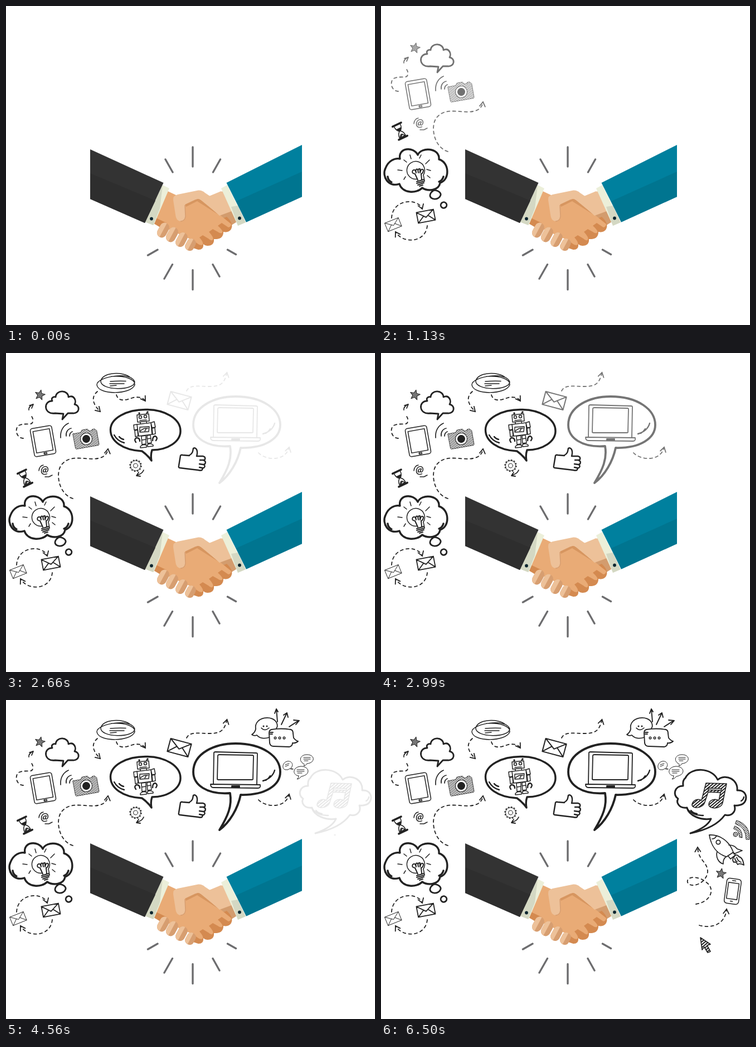
These frames come from a looping animation (662x572 px, 8000 ms). An HTML page:

```html
<!DOCTYPE html>
<html lang="en">
<head>
<meta charset="utf-8">
<title>Handshake</title>
<style>
html, body { margin: 0; width: 100%; height: 100%; overflow: hidden; background: #fff; }
svg { display: block; }
.doodle { fill: none; stroke: #222; stroke-width: 1.5; stroke-linecap: round; stroke-linejoin: round; opacity: 0; }
.dash { stroke-width: 1.8; stroke-dasharray: 5 5.5; marker-end: url(#head); }
.plain { marker-end: none; }
.bold { stroke-width: 3.4; }
.mid { stroke-width: 2.4; }
.thin { stroke-width: 1; }
.ink { fill: #222; }
.hatch { fill: url(#hatch); }
.stripes { fill: url(#stripes); }
.rays { stroke: #6d6d6f; stroke-width: 3.4; stroke-linecap: round; }
</style>
</head>
<body>
<svg width="662" height="572" viewBox="0 0 662 572">
<defs>
  <pattern id="hatch" width="2.6" height="2.6" patternUnits="userSpaceOnUse" patternTransform="rotate(40)">
    <path d="M0 1.3H2.6" stroke="#222" stroke-width="1"/>
  </pattern>
  <pattern id="stripes" width="4" height="4" patternUnits="userSpaceOnUse" patternTransform="rotate(-40)">
    <path d="M0 2H4" stroke="#222" stroke-width="2"/>
  </pattern>
  <marker id="head" markerUnits="userSpaceOnUse" markerWidth="24" markerHeight="24" viewBox="-12 -12 24 24" orient="auto">
    <path d="M-8 -5L0 0L-8 5" fill="none" stroke="#222" stroke-width="1.8" stroke-linecap="round"/>
  </marker>
  <g id="mail"><path d="M-16 -10H16V10H-16ZL0 2L16 -10M-16 10L-4 -1M16 10L4 -1" vector-effect="non-scaling-stroke"/></g>
  <path id="star" fill="#777" stroke-width="1" d="M0 -9L2.5 -3L9 -2.8L4 1.5L5.5 8L0 4.5L-5.5 8L-4 1.5L-9 -2.8L-2.5 -3Z"/>
  <g id="finger">
    <rect x="-8.5" y="-14" width="17" height="28" rx="8.5" fill="#d79e70"/>
    <path d="M0 -14V14A8.5 8.5 0 0 1 -8.5 5.5V-5.5A8.5 8.5 0 0 1 0 -14" fill="#edc199"/>
  </g>
</defs>

<!-- handshake -->
<path class="rays" d="M335 253V288M286 275L299 298M384.500 275L371.500 298M272 437L254.500 447M298.500 463.500L284 489M335 473.500V508.500M371 463.500L383 485M397.500 437L412.500 445.500"/>
<path fill="#edc199" d="M386 332L412 366L384 378L345 349Z"/>
<path fill="#d39c6e" d="M383 375L408 364L414 387L403 394Z"/>
<path fill="#d48a50" d="M340 400L396 378Q409 390 404 400Q400 407 390 405Q390 417 378 418Q374 418 373 418Q374 430 361 430Q357 430 354 427Q355 437 345 437L336 434Z"/>
<path fill="#e9ab76" d="M290 332L320 346L344 348L383 374L404 391Q404 396 399 397L387 389L380 394Q392 405 387 407Q384 408 380 405L371 400L364 405Q375 417 370 420Q367 421 363 417L353 411L347 415Q355 424 353 428Q349 430 345 427L335 420L266 389Z"/>
<path fill="#d48a50" d="M265 390L269 380L288 389L282 400Z"/>
<use href="#finger" transform="translate(282 402) rotate(28)"/>
<use href="#finger" transform="translate(298 410) rotate(28)"/>
<use href="#finger" transform="translate(315 419) rotate(28) scale(.98)"/>
<use href="#finger" transform="translate(331 428) rotate(28) scale(.95 .8)"/>
<path fill="#d79660" d="M320 352L346 345L384 376L343 350L323 360Z"/>
<path fill="#edc199" d="M389 332L410 366L383 376L355 351Q347 344 340 347L321 356L322 377Q321 386 313 386Q305 385 304 374L300 348Q299 340 308 338L345 330.500Q352 330 357 335L366 341Z"/>
<path fill="none" stroke="#d79e70" stroke-width="1.500" d="M321 357L322 377Q321 386 313 386"/>
<path fill="#ecefd9" d="M281 321L293 327L265 393L249 387Z"/>
<path fill="#d4d8c3" d="M281 322L276 363L264 393L249 387Z"/>
<path fill="#333" d="M151 257L282.500 317L249 389L151 346Z"/>
<path fill="#2e2e2e" d="M151 300L268 349L249 389L151 346Z"/>
<path fill="#ecefd9" d="M386 327L397 321L430 388L416 394Z"/>
<path fill="#d4d8c3" d="M404 360L416 358L430 388L416 394Z"/>
<path fill="#00809e" d="M531 249L395.500 317L431 387.500L531 342Z"/>
<path fill="#007590" d="M531 297L413 350L431 387.500L531 342Z"/>
<circle cx="261" cy="381.500" r="2.900" fill="#0c2630"/>
<circle cx="419" cy="380.500" r="2.900" fill="#0c2630"/>

<!-- ideas -->
<g class="doodle">
  <g transform="translate(34 224.500) rotate(-25.500)">
    <path d="M-8.500 -13H8.500M-8.500 13H8.500" stroke-width="3.500"/>
    <path d="M-6 -11Q-6 -4 -1 0Q-6 4 -6 11M6 -11Q6 -4 1 0Q6 4 6 11"/>
    <path class="ink" d="M-4 -5H4L0 0Z"/>
    <path class="stripes" d="M-5 11Q0 1 5 11Z"/>
  </g>
  <path class="bold" d="M34 274C30 254 58 251 66 267C72 252 106 254 104 275C123 280 124 312 106 317C104 331 84 333 74 326C64 337 38 336 33 319C13 326 1 305 8 291C13 278 24 272 34 274Z"/>
  <path class="bold" d="M12 306Q13 313 19 316M112 306Q110 313 104 315"/>
  <path d="M64 310.500A16 16 0 1 1 76 303L78 313M52 267L54 274M41 276L46 280M72 267L69 273M87 276L80 283M30 294L38 295M82 293L89 295M41 311L44 306M83 304L88 308"/>
  <path stroke-width="2" d="M66 312L61 301Q54 300 57 295Q61 291 63 299Q61 291 66 293L67 299Q65 291 70 292L70 299Q72 290 76 294Q76 300 72 301L73 311M64 315L77 311M64 318L78 314M66 321L77 317M69 323L75 321"/>
  <path stroke-width="2.800" d="M91 333C96 327 108 333 107 339C104 349 87 348 88 339Q89 334 93 332M109 353C115 349 121 356 116 361C110 365 104 358 109 353"/>
  <use href="#mail" class="thin" transform="translate(22 392) rotate(-22) scale(.81)"/>
  <use href="#mail" transform="translate(80.500 377) rotate(-11) scale(.97)" stroke-width="1.800"/>
  <path class="dash" d="M19 380C21 345 67 344 74 364"/>
  <path class="dash" d="M83 394C80 425 39 427 26 405"/>
</g>

<!-- media -->
<g class="doodle">
  <use href="#star" transform="translate(61 75) rotate(12)"/>
  <path stroke-width="2.800" d="M103 109L88 108C68 111 66 86 83 86C80 80 86 78 89 79C90 65 112 66 112 79C122 74 127 86 123 92C134 94 132 109 120 108L111 108L101 119L103 109"/>
  <path class="dash plain" d="M31 153C18 153 14 133 25 129C37 125 48 131 48 122Q49 115 43 111"/>
  <path d="M41 102Q40 97 48 92M42 94L49 92L46 99" stroke-width="1.800"/>
  <g transform="translate(66.500 158) rotate(-10)">
    <rect x="-19.500" y="-25.500" width="39" height="51" rx="4"/>
    <rect x="-15" y="-20" width="30" height="39"/>
    <rect x="-2" y="21" width="5" height="2.500"/>
  </g>
  <path stroke-width="1.700" d="M98 152C97 139 103 130 112 126M108 149C107 142 111 136 117 135M114 149Q114 143 119 141"/>
  <g transform="translate(144 154) rotate(-10)">
    <path class="hatch" stroke-width=".8" d="M-22 -13H-8L-5 -17H5L8 -13H13V-15H18V-13Q21 -13 21 -11V13Q21 15 19 15H-20Q-22 15 -22 13Z"/>
    <circle r="10.500" fill="#fff" class="thin"/>
    <circle r="6.500" class="ink thin"/>
  </g>
  <text x="62" y="216" font-family="Lato, sans-serif" font-style="italic" font-weight="700" font-size="19" fill="#222" stroke="none">@</text>
  <path d="M59 211Q60 202 67 201M70 222L77 222L83 219"/>
  <path class="dash" d="M120 261C94 253 88 214 100 200C116 180 145 193 165 189Q181 186 183 172"/>
</g>

<!-- robot -->
<g class="doodle">
  <path d="M222 43C212 34 174 33 170 50C169 68 230 68 231 52C226 32 163 42 163 57C165 76 225 75 231 57C232 47 213 40 189 42M187 51Q200 50 215 50.500M186 55L212 55M187 59L198 58"/>
  <path class="dash" stroke-width="1.500" d="M164 69C151 80 157 93 169 105"/>
  <path class="dash" d="M198 75C202 88 214 85 228 80C238 78 246 80 250 86"/>
  <path class="bold" d="M244 176C209 174 187 158 187.500 137C188 117 216 101.500 250 101.500C285 101 313 118 313 140C313 159 290 174 262 174Q259 183 261 193Q254 183 244 176Z"/>
  <path class="mid" d="M194 147Q200 158 212 161M203 150Q206 154 211 155"/>
  <path d="M235 111L256 109L257 122L236 124ZM239 111L239 108M252 109L253 106M240 121L252 120M241 124L241 127M252 123L252 126M235 128L260 125L262 146L238 149ZM240 133L257 132L256 141L240 142ZM229 129L235 128L236 137L230 138ZM260 125L266 123L268 133L262 134ZM231 139L236 138L237 149L232 150ZM262 135L267 134L268 145L263 146ZM243 149L251 148L251 163L244 164ZM253 148L259 147L261 161L254 162ZM241 168Q244 163 252 165L252 169L241 170ZM254 164Q260 161 264 165L264 167L254 168ZM244 156L251 155M253 154L260 153"/>
  <path class="mid" d="M233 160Q229 155 234 152Q240 152 240 158M263 157Q263 149 268 149Q273 152 269 157"/>
  <path d="M241 140Q247 134 255 135M249 140L252 135"/>
  <circle cx="241" cy="115" r="2.500"/><circle cx="250" cy="114" r="2.500"/>
  <circle cx="239" cy="108" r="1" class="ink"/><circle cx="254" cy="106" r="1" class="ink"/>
  <circle cx="232.500" cy="202" r="9" stroke-width=".9"/>
  <circle cx="232.500" cy="202" r="10.200" stroke-width="1.800" stroke-dasharray="2.800 2.541" stroke-linecap="butt"/>
  <circle cx="232.500" cy="202" r="4" class="thin"/>
  <path stroke-width="1.800" d="M247 210Q244 217 235 219M238 214L234 220L241 221"/>
  <path class="mid" d="M328 184C336 180 335 175 336 171C341 168 345 175 342 185L353 185C359 186 358 192 354 192C360 194 358 200 354 200C359 202 356 207 352 206C354 211 349 211 345 210L328 208L312 206Q309 206 310 202L313 184Q314 182 317 183L329 184M348 192L354 192M347 199L354 200M347 205L352 206"/>
</g>

<!-- laptop -->
<g class="doodle">
  <use href="#mail" transform="translate(311 85.500) rotate(15) scale(1.200)" stroke-width="2"/>
  <path class="dash" d="M324 68C330 56 345 60 365 60C386 60 392 54 396.500 35"/>
  <path stroke-width="3.800" d="M402 167C360 170 336 152 336 129C336 95 375 78 412 78C460 78 492 101 492 129C492 153 465 171 421 170C416 194 402 219 383 233C398 208 406 190 402 167Z"/>
  <path d="M372 151L373 95Q373 93 376 93L449 95Q451 95 451 97L450 151M379 142L380 100Q380 98 383 98L442 99Q444 99 444 101L443 142Q443 143 441 143L381 143Q379 143 379 141M367 151L456 152Q457 158 452 158L372 157Q367 157 367 151ZM405 154H419V156H405Z" stroke-width="1.800"/>
  <path class="mid" d="M461 145Q478 140 482 126M466 144Q471 141 474 136"/>
  <path class="dash" d="M453 179C465 192 501 196 508 169"/>
</g>

<!-- chat -->
<g class="doodle">
  <path stroke-width="1.800" d="M472 67C464 70 455 69 450 63Q445 65 441 62Q447 58 448 52C444 30 480 25 486 42Q488 47 485 51"/>
  <path d="M458 50Q464 57 472 50"/>
  <circle cx="462" cy="47" r=".8" class="ink"/><circle cx="468" cy="47" r=".8" class="ink"/>
  <path stroke-width="1.900" d="M476 53Q493 50 511 53Q515 54 515 60L516 68Q520 73 524 74Q520 78 514 77Q514 83 508 84L480 83Q474 83 473 77L472 59Q472 54 476 53M474 58H479M474 61H478"/>
  <circle cx="483" cy="68" r="1.800"/><circle cx="491" cy="68" r="1.800"/><circle cx="499" cy="68" r="1.800"/>
  <path stroke-width="1.900" d="M487 39L485 16M482 24L485 16L488 21M494 44L504 23M498 27L504 23L506 31M508 48L525 37M516 36L526 37L520 44"/>
  <path class="thin" d="M532 113C525 108 528 98 540 98C555 98 555 113 540 114Q537 119 534 118Q537 115 532 113M525 136C514 135 513 121 528 119C544 118 548 134 530 137Q526 142 522 142Q526 139 525 136M511 122C517 117 513 108 504 110C495 113 495 124 501 125Q507 126 509 123Q512 125 515 124ZM534 103H546M534 106H546M535 109H542M522 125H535M522 128H535M523 131H531M501 116L508 114M501 119L507 117"/>
</g>

<!-- music -->
<g class="doodle">
  <path stroke-width="3" d="M592 213C575 216 552 208 549 193C535 195 529 184 533 177C523 171 526 154 542 154C541 145 543 142 546 140C556 119 594 121 604 143C619 131 641 143 639 162C658 160 660 184 645 188Q638 190 634 189C638 201 628 209 617 206Q600 230 555 239Q586 228 592 213"/>
  <path class="mid" d="M549 195Q560 208 578 207M556 198Q560 203 567 204M646 181Q650 179 651 174"/>
  <path class="stripes" d="M583 149L620 150L613 184C611 196 588 197 588 187C589 179 599 176 606 180L609 166L587 165L581 183C578 195 557 196 558 187C560 179 569 176 575 180Z"/>
  <path fill="#fff" d="M587 158L611 159L610 162L587 161Z"/>
  <path d="M589 242L591 242"/>
</g>

<!-- rocket -->
<g class="doodle">
  <path class="hatch thin" d="M635 226Q649 231 648 247L643 246Q643 234 633 231ZM638 216Q662 223 661 250L655 250Q655 228 636 222Z"/>
  <circle cx="636" cy="241" r="4" class="hatch thin"/>
  <path stroke-width="1.700" d="M589 242C608 241 625 253 632 273L620 281C602 276 592 261 589 242ZM624 260Q634 260 639 267L648 270L633 276M603 272C600 282 606 292 614 294Q613 286 619 281M594 249Q600 249 602 243M623 280L627 285L636 278L632 273"/>
  <circle cx="605" cy="255" r="3.700" stroke-width="1.800"/>
  <path stroke-width="1.800" d="M636 278Q640 277 642 281Q649 282 651 296Q643 292 640 295Q637 289 633 291Q628 286 636 278M638 282Q640 289 646 291M635 284Q635 288 639 290"/>
  <path class="dash" d="M565 366C591 362 600 340 585 328C570 314 547 316 550 327C556 339 584 329 586 308C586 290 569 288 568 264"/>
  <use href="#star" transform="translate(610 311) rotate(10)"/>
  <g transform="translate(631 343) rotate(8)">
    <rect x="-13" y="-22.500" width="26" height="45" rx="5"/>
    <rect x="-9.500" y="-15" width="19" height="29"/>
    <path d="M-3 -19H3M-2 18H2"/>
  </g>
  <path class="dash" d="M571 404C592 410 617 404 620 375"/>
  <path class="stripes" stroke-width="1.600" d="M573 426L591 438L585 440L591 451L586 453L580 443L576 448Z"/>
</g>
</svg>
<script>
const LOOP = 8000, STEP = 30, FIRST = 0.1;
const fades = [[190, 670], [860, 1310], [1600, 2170], [2660, 3230], [3690, 4200], [4560, 5070], [5930, 6500]];
const groups = document.querySelectorAll('.doodle');
const begin = performance.now();

function alpha(t, [from, to]) {
  if (t < from) return 0;
  const passed = Math.floor((t - from) / STEP) * STEP;
  return Math.min(1, FIRST + (1 - FIRST) * passed / (to - from));
}

function draw() {
  const t = (performance.now() - begin) % LOOP;
  groups.forEach((g, i) => { g.style.opacity = alpha(t, fades[i]); });
  requestAnimationFrame(draw);
}
draw();
</script>
</body>
</html>
```
